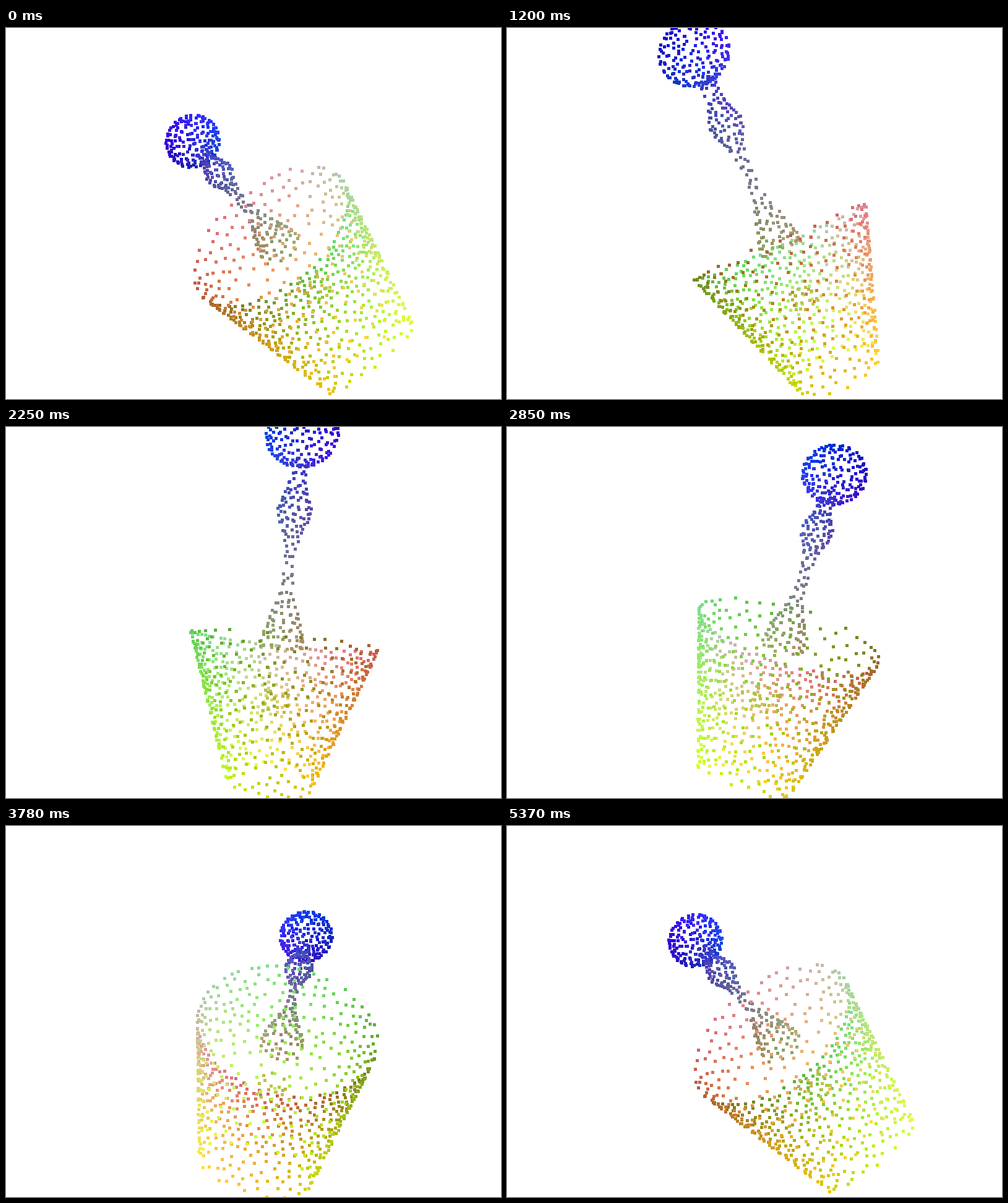
Write a matplotlib script that moves like this. It is 800 by 600 pixels and loops after 5400 ms.

```python
import numpy as np
import matplotlib.pyplot as plt
from matplotlib.animation import FuncAnimation

W, H, DPI = 800, 600, 100
FRAMES, INTERVAL = 180, 30
N_POINTS = 1024
FOCAL = H / 2 / np.tan(np.radians(30))
START_ANGLE = -116.4

# Pivot relative to the camera (at distance 1) and the turning axis
PIVOT = np.array([0.081, -0.083, -1.0])
UP = np.array([-0.1236, 0.849, -0.5138])
UP /= np.linalg.norm(UP)
NEAR = np.array([0, 0, 1]) - UP[2] * UP
NEAR /= np.linalg.norm(NEAR)
SIDE = np.cross(UP, NEAR)

# The lamp is a solid of revolution about a line leaning off the turning axis
LEAN = np.radians(26.7)
AXIS_SHIFT = 0.0155

rng = np.random.default_rng(7)


def profiles():
    """Outlines as (position along lamp axis, radius) polylines."""
    a = np.linspace(0, np.pi, 19)
    ball = np.column_stack([0.68 + 0.083 * np.cos(a), 0.121 * np.sin(a)])
    stem = [(0.595, 0.025), (0.50, 0.028), (0.46, 0.040), (0.42, 0.055),
            (0.385, 0.050), (0.35, 0.033), (0.305, 0.021), (0.25, 0.014),
            (0.18, 0.016), (0.125, 0.023), (0.08, 0.039), (0.04, 0.051),
            (0.0, 0.062), (-0.035, 0.064)]
    socket = [(-0.165, 0.036), (-0.225, 0.036)]
    shade = [(-0.013, 0.278), (-0.4175, 0.124)]
    return [np.array(p) for p in (ball, stem, socket, shade)]


def sample_surface(n):
    """Random (axis position, radius, angle) spread evenly by area."""
    p0 = np.vstack([p[:-1] for p in profiles()])
    p1 = np.vstack([p[1:] for p in profiles()])
    area = (p0[:, 1] + p1[:, 1]) * np.hypot(*(p1 - p0).T)
    seg = rng.choice(len(area), n, p=area / area.sum())
    r0, r1 = p0[seg, 1], p1[seg, 1]
    v = rng.random(n)
    dr = np.where(np.abs(r1 - r0) < 1e-9, 1e-9, r1 - r0)
    # Equal radii make the area rule degenerate to a plain uniform draw
    v = np.where(np.abs(r1 - r0) < 1e-9, v,
                 (np.sqrt(r0**2 + v * (r1**2 - r0**2)) - r0) / dr)
    v = np.clip(v, 0, 1)[:, None]
    s, r = (p0[seg] + v * (p1[seg] - p0[seg])).T
    return s, r, rng.uniform(0, 2 * np.pi, n)


def farthest_points(xyz, n):
    chosen = [0]
    dist = np.full(len(xyz), np.inf)
    for _ in range(n - 1):
        dist = np.minimum(dist, ((xyz - xyz[chosen[-1]]) ** 2).sum(axis=1))
        chosen.append(int(dist.argmax()))
    return np.array(chosen)


def build_cloud():
    s, r, ang = sample_surface(5000)
    p, q = r * np.cos(ang), r * np.sin(ang)
    radial = AXIS_SHIFT + s * np.sin(LEAN) + p * np.cos(LEAN)
    height = s * np.cos(LEAN) - p * np.sin(LEAN)
    xyz = np.column_stack([radial, q, height])

    # Colour is the position read along three tilted orthogonal axes
    hue = ang - np.radians(156)
    tilt = np.radians(61)
    rgb = np.column_stack([154 - 174 * s + 240 * r * np.cos(hue + tilt),
                           154 - 174 * s + 240 * r * np.cos(hue - tilt),
                           105 + 170 * s + 250 * r * np.cos(hue)])
    keep = farthest_points(xyz, N_POINTS)
    return xyz[keep], np.clip(rgb[keep] / 255, 0, 1)


cloud, colors = build_cloud()

fig = plt.figure(figsize=(W / DPI, H / DPI), dpi=DPI, facecolor="white")
ax = fig.add_axes([0, 0, 1, 1])
ax.set_xlim(0, W)
ax.set_ylim(H, 0)
ax.axis("off")
dots = ax.scatter(cloud[:, 0], cloud[:, 1], s=(5 * 72 / DPI) ** 2, marker="s",
                  c=colors, linewidths=0, antialiased=False)


def update(i):
    th = np.radians(START_ANGLE + 360 * i / FRAMES)
    out = NEAR * np.cos(th) + SIDE * np.sin(th)
    tangent = SIDE * np.cos(th) - NEAR * np.sin(th)
    pos = PIVOT + cloud @ np.array([out, tangent, UP])
    depth = -pos[:, 2]
    x = W / 2 + FOCAL * pos[:, 0] / depth
    y = H / 2 - FOCAL * pos[:, 1] / depth
    order = np.argsort(-depth)
    xy = np.floor(np.column_stack([x, y])) + 0.5
    dots.set_offsets(xy[order])
    dots.set_facecolors(colors[order])
    return (dots,)


anim = FuncAnimation(fig, update, frames=FRAMES, interval=INTERVAL,
                     repeat=True, repeat_delay=0)
plt.show()
```
